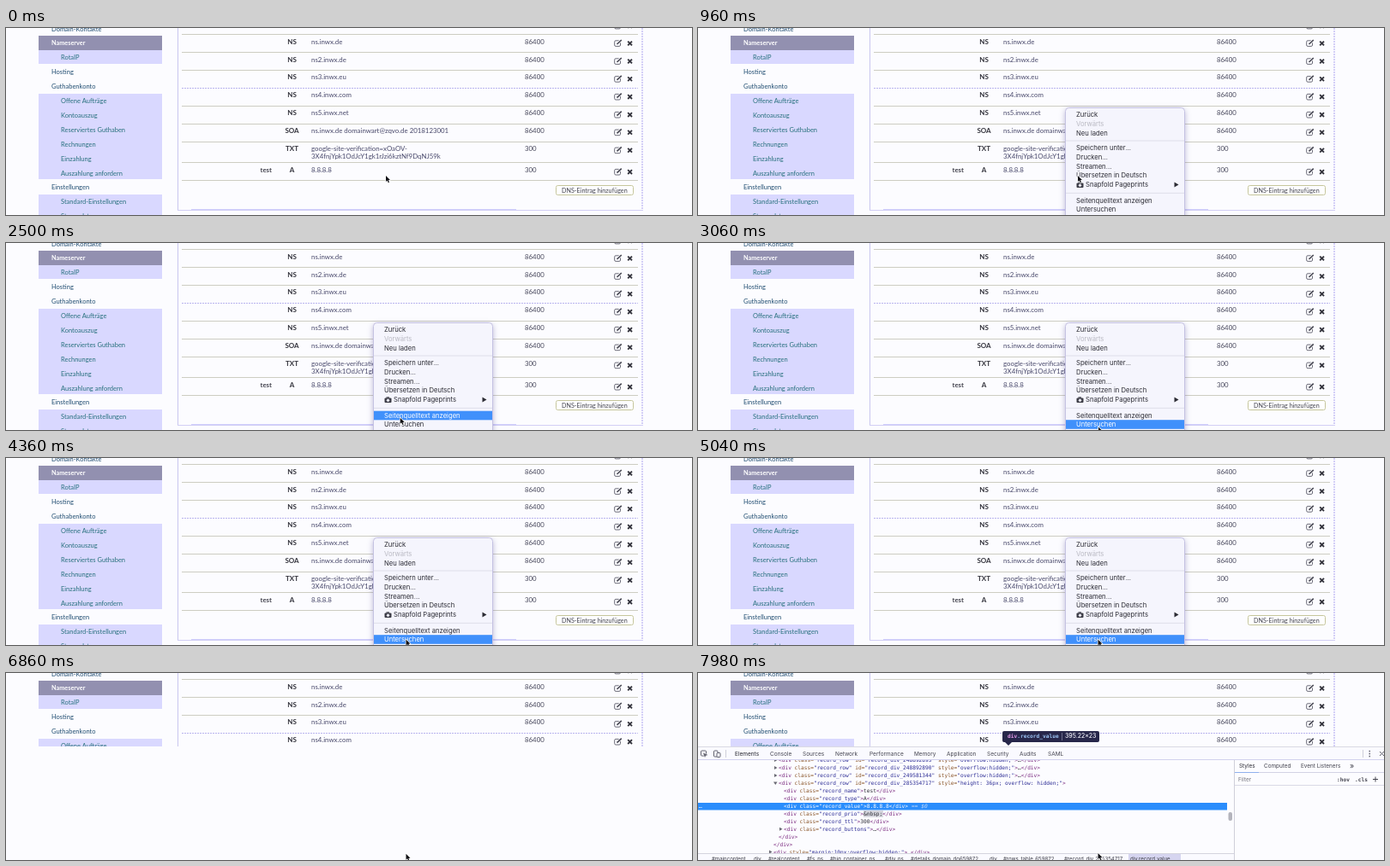
Animation, 800 px wide and 219 px high, one loop 8 s. Source, as an HTML page with a canvas:

```html
<!DOCTYPE html>
<html lang="de">
<head>
<meta charset="utf-8">
<title>DNS-Einträge untersuchen</title>
<style>
  html, body { margin: 0; width: 100%; height: 100%; overflow: hidden; background: #fcfcff; }
  canvas { display: block; width: 800px; height: 219px; }
</style>
</head>
<body>
<canvas id="stage" width="800" height="219"></canvas>
<script>
const ctx = document.getElementById('stage').getContext('2d');
const LOOP = 8000;
const BG = '#fcfcff';
const LATO = 'Lato, sans-serif';
const UI = 'Inter, sans-serif';
const MONO = '"DejaVu Sans Mono", monospace';
const CODE = '6.18px ' + MONO;
const CHAR = 3.72;

const T = {
  menuOpen: 420, menuClick: 5080, menuGone: 5240,
  split: 6850, tools: 7120, tree: 7220, tip: 7420
};

function rect(x, y, w, h, color) {
  ctx.fillStyle = color;
  ctx.fillRect(x, y, w, h);
}

function round(x, y, w, h, r, fill, stroke) {
  ctx.beginPath();
  ctx.roundRect(x, y, w, h, r);
  if (fill) { ctx.fillStyle = fill; ctx.fill(); }
  if (stroke) { ctx.strokeStyle = stroke; ctx.lineWidth = 1; ctx.stroke(); }
}

// y is the middle of the capitals
function text(str, x, y, font, color) {
  ctx.font = font;
  ctx.fillStyle = color;
  ctx.fillText(str, x, y + parseFloat(font.match(/[\d.]+px/)[0]) * 0.36);
}

function line(x1, y1, x2, y2, color, dash = [], width = 1) {
  ctx.strokeStyle = color;
  ctx.lineWidth = width;
  ctx.setLineDash(dash);
  ctx.beginPath();
  ctx.moveTo(x1, y1);
  ctx.lineTo(x2, y2);
  ctx.stroke();
  ctx.setLineDash([]);
}

function poly(points, fill, stroke, width = 1) {
  ctx.beginPath();
  points.forEach(([x, y]) => ctx.lineTo(x, y));
  ctx.closePath();
  if (stroke) {
    ctx.strokeStyle = stroke;
    ctx.lineWidth = width;
    ctx.lineJoin = 'round';
    ctx.stroke();
  }
  if (fill) { ctx.fillStyle = fill; ctx.fill(); }
}

/* ---------- page ---------- */

const NAV = [
  ['Domain-Kontakte', 1], ['Nameserver', 17.3, 'on'], ['RotaIP', 34.5, 'sub'],
  ['Hosting', 51.3], ['Guthabenkonto', 68.3],
  ['Offene Aufträge', 85.5, 'sub'], ['Kontoauszug', 102.3, 'sub'],
  ['Reserviertes Guthaben', 119.3, 'sub'], ['Rechnungen', 136, 'sub'],
  ['Einzahlung', 153, 'sub'], ['Auszahlung anfordern', 170, 'sub'],
  ['Einstellungen', 186.7], ['Standard-Einstellungen', 203.5, 'sub'],
  ['Stammdaten', 220.3, 'sub']
];

const RECORDS = [
  ['', 'NS', ['ns.inwx.de'], '86400', 15.7],
  ['', 'NS', ['ns2.inwx.de'], '86400', 36.7],
  ['', 'NS', ['ns3.inwx.eu'], '86400', 57.5],
  ['', 'NS', ['ns4.inwx.com'], '86400', 78.3],
  ['', 'NS', ['ns5.inwx.net'], '86400', 99.3],
  ['', 'SOA', ['ns.inwx.de domainwart@zqvo.de 2018123001'], '86400', 120],
  ['', 'TXT', ['google-site-verification=xOaOV-', '3X4fnjYpk1OdJcY1gk1rJzi6kztNf9DqNJ59k'], '300', 141],
  ['test', 'A', ['8.8.8.8'], '300', 166.3]
];

function sidebar() {
  rect(38, 9, 144, 17, '#9290b0');
  rect(38, 26, 144, 16, '#d9d8ff');
  rect(38, 77, 144, 100, '#d9d8ff');
  rect(38, 195, 144, 24, '#d9d8ff');
  for (const [label, y, kind] of NAV) {
    const color = kind === 'on' ? '#ffffff' : kind ? '#27707c' : '#1f4c70';
    text(label, kind === 'sub' ? 64 : 53, y, (kind === 'on' ? 'bold 7.3px ' : '7.5px ') + LATO, color);
  }
}

function rowIcons(y) {
  const ink = '#4a4a55';
  round(709.7, y - 3.2, 6.8, 6.6, 1.4, null, '#6b6b78');
  line(712.3, y + 1.2, 717.8, y - 4, BG, [], 3.2);
  line(712.5, y + 1, 717.8, y - 4, ink, [], 1.7);
  line(725.2, y - 2.4, 730, y + 2.4, '#33333c', [], 1.9);
  line(730, y - 2.4, 725.2, y + 2.4, '#33333c', [], 1.9);
}

function page() {
  sidebar();
  line(200.5, 0, 200.5, 213, '#c9c6ee');
  line(742, 0, 742, 214, '#c2bcf4', [2, 1], 1.4);
  line(200, 213.5, 742, 213.5, '#d2cff5');
  line(216, 212.5, 595, 212.5, '#cfcdfb');
  [7, 28, 49, 70, 91, 112, 133, 157, 178].forEach(y =>
    line(205, y + 0.5, 737, y + 0.5, y === 70 ? '#b9b4ee' : '#cdcdc2', y === 70 ? [2, 1] : []));
  rowIcons(-2.5);
  for (const [name, type, values, ttl, y] of RECORDS) {
    text(name, 296.5, y, 'bold 7.85px ' + LATO, '#44444f');
    ctx.textAlign = 'center';
    text(type, 333.5, y, 'bold 8px ' + LATO, '#33333c');
    ctx.textAlign = 'left';
    values.forEach((v, i) => text(v, 356, y + i * 9.3, '7.85px ' + LATO, '#48486a'));
    text(ttl, 605, y, '7.85px ' + LATO, '#48485c');
    rowIcons(y + 2.3);
  }
  round(641.5, 184.5, 90, 11, 2, '#fefeff', '#c6c69c');
  text('DNS-Eintrag hinzufügen', 648, 190.3, '7.2px ' + LATO, '#44444f');
}

/* ---------- context menu ---------- */

const MENU = [
  ['Zurück', 101.5], ['Vorwärts', 112], ['Neu laden', 123],
  ['Speichern unter…', 140.7], ['Drucken…', 151.3], ['Streamen…', 161.8],
  ['Übersetzen in Deutsch', 172.6], ['Snapfold Pageprints', 183.6],
  ['Seitenquelltext anzeigen', 202], ['Untersuchen', 212.5]
];

// [from, to, item]
const HOVER = [[1480, 2080, 6], [2080, 2300, 7], [2380, 2520, 8], [2520, T.menuClick, 9]];

function menu(t) {
  if (t < T.menuOpen || t >= T.menuGone) return;
  const fade = (T.menuGone - t) / 100;
  const hit = HOVER.find(([a, b]) => t >= a && t < b);
  const active = hit ? hit[2] : t >= T.menuClick + 60 ? 9 : -1;
  ctx.save();
  ctx.globalAlpha = Math.min(1, fade);
  ctx.shadowColor = 'rgba(70,60,140,.4)';
  ctx.shadowBlur = 7;
  ctx.shadowOffsetY = 2;
  round(428.5, 93.5, 139, 150, 4, '#f5f5fd');
  ctx.shadowColor = 'transparent';
  round(428.5, 93.5, 139, 150, 4, null, '#c5c2e2');
  line(429, 132, 567, 132, '#dedeea');
  line(429, 193.3, 567, 193.3, '#dedeea');
  MENU.forEach(([label, y], i) => {
    const on = i === active;
    if (on) rect(429, y - 5.3, 138, 10.6, '#4090fb');
    const color = on ? '#ffffff' : i === 1 ? '#b9b9c2' : '#2c2c34';
    text(label, i === 7 ? 452 : 441, y, '7.65px ' + UI, color);
    if (i !== 7) return;
    round(441.5, y - 2.2, 8, 5.6, 1, '#3c3c46');
    rect(443.5, y - 3.3, 3.5, 1.4, '#3c3c46');
    ctx.beginPath();
    ctx.arc(445.5, y + 0.6, 1.7, 0, 7);
    ctx.fillStyle = '#e8e8f4';
    ctx.fill();
    poly([[555.5, y - 3], [560.5, y], [555.5, y + 3]], color);
  });
  ctx.restore();
}

/* ---------- developer tools ---------- */

const TABS = [['Elements', 43], ['Console', 84], ['Sources', 122], ['Network', 160],
  ['Performance', 200], ['Memory', 252], ['Application', 290], ['Security', 337],
  ['Audits', 375], ['SAML', 408]];

const CRUMBS = [['#maincontent', 16], ['div', 65], ['#realcontent', 82], ['#fs_ns', 127],
  ['#big_container_ns', 154], ['#div_ns', 218], ['#details_domain_do659872', 248],
  ['div', 340], ['#rows_table_659872', 356], ['#record_div_285354717', 427],
  ['div.record_value', 504]];

const row = id => `<div class="record_row" id="record_div_${id}" style="overflow:hidden;">…</div>`;
const cell = (name, value) => `<div class="record_${name}">${value}</div>`;

// [indent x, arrow, markup]
const TREE = [
  [94, '>', row(248892895)],
  [94, '>', row(248892890)],
  [94, '>', row(249581344)],
  [94, 'v', '<div class="record_row" id="record_div_285354717" style="height: 36px; overflow: hidden;">'],
  [100, '', cell('name', 'test')],
  [100, '', cell('type', 'A')],
  [100, '', cell('value', '8.8.8.8')],
  [100, '', cell('prio', '&nbsp;')],
  [100, '', cell('ttl', '300')],
  [100, '>', cell('buttons', '…')],
  [94, '', '</div>'],
  [88, '', '</div>'],
  [88, '>', '<div style="margin:10px;overflow:hidden;">…</div>']
];

function tokenColor(part) {
  if (/^[<>]/.test(part)) return '#7c2c80';
  if (part.endsWith('=')) return '#8a5426';
  return part[0] === '"' ? '#2b2b94' : '#2c2c34';
}

function markup(src, x, y, plain) {
  for (const part of src.match(/<\/?\w+|>|\s\w+=(?=")|"[^"]*"|[^<>"]+/g)) {
    text(part, x, y, CODE, plain || tokenColor(part));
    x += part.length * CHAR;
  }
  return x;
}

function tree() {
  ctx.save();
  ctx.beginPath();
  ctx.rect(0, 102, 625, 109);
  ctx.clip();
  TREE.forEach(([x, arrow, src], i) => {
    const y = 102.1 + i * 8.96;
    const on = i === 6;
    if (on) {
      rect(0, 152, 617, 8.5, '#2a8dfc');
      text('…', 1, y, CODE, '#ffffff');
    }
    if (i === 7) rect(193, y - 4, 23, 8, '#d6d6de');
    if (arrow === '>') poly([[x - 5, y - 2], [x - 1.5, y], [x - 5, y + 2]], '#6a6a74');
    if (arrow === 'v') poly([[x - 6, y - 1.5], [x - 1.5, y - 1.5], [x - 3.7, y + 2]], '#6a6a74');
    const end = markup(src, x, y, on && '#ffffff');
    if (on) text('== $0', end + 4, y, 'italic ' + CODE, '#c4dafa');
  });
  ctx.restore();
  round(618.5, 163, 4.5, 10, 2, '#b4b4bc');
}

function crumbs() {
  rect(0, 211, 625, 8, '#fafaff');
  line(0, 211.5, 625, 211.5, '#d4d4de');
  rect(502, 212, 61, 7, '#d6d5f0');
  CRUMBS.forEach(([label, x]) => text(label, x, 218, '6.1px ' + UI, '#3c3c46'));
}

function stylesPane() {
  const font = '6.4px ' + UI;
  line(625.5, 102, 625.5, 219, '#cfcfda');
  line(626, 116.5, 800, 116.5, '#d2d2e4');
  line(626, 116.5, 654, 116.5, '#8fb0ee');
  text('Styles', 631, 109, font, '#2c2c34');
  text('Computed', 660, 109, font, '#44444f');
  text('Event Listeners', 703, 109, font, '#44444f');
  text('»', 760, 108.5, '9px ' + UI, '#44444f');
  text('Filter', 630, 124.5, font, '#75757f');
  text(':hov', 745, 124.5, 'bold ' + CODE, '#44444f');
  text('.cls', 766, 124.5, 'bold ' + CODE, '#44444f');
  line(787, 124.5, 793, 124.5, '#44444f');
  line(790, 121.5, 790, 127.5, '#44444f');
  line(626, 131.5, 800, 131.5, '#dadae6');
}

function toolbar() {
  const ink = '#62626e';
  rect(0, 87, 800, 15, '#fafaff');
  line(0, 86.5, 800, 86.5, '#dadae2');
  line(0, 101.5, 800, 101.5, '#d2d1ee');
  round(3.5, 91, 6, 6, 1, null, ink);
  poly([[6, 93.5], [11.5, 96], [9, 96.8], [8, 99]], ink, '#fafaff');
  round(18.5, 91, 4.5, 7, 1, null, ink);
  round(22, 93.5, 4, 5, 0.8, '#fafaff', ink);
  line(32.5, 90, 32.5, 99, '#cfcfda');
  TABS.forEach(([label, x], i) => text(label, x, 94.4, '6.5px ' + UI, i ? '#44444f' : '#24242c'));
  line(775.5, 90, 775.5, 99, '#cfcfda');
  [91.5, 94.5, 97.5].forEach(y => rect(782.5, y - 0.7, 1.5, 1.5, ink));
  line(795, 92, 800, 97, ink);
  line(800, 92, 795, 97, ink);
}

function tooltip() {
  round(355, 68, 113, 13, 2, '#27274a');
  poly([[358, 81], [366, 81], [362, 85]], '#27274a');
  const font = 'bold 6.2px ' + MONO;
  text('div', 361, 74, font, '#e39ae8');
  text('.record_value', 372.2, 74, font, '#9cc4f4');
  line(424.5, 70, 424.5, 79, '#6c6c8c');
  text('395.22×23', 428, 74, '500 6.9px ' + UI, '#f4f4fc');
}

function devtools(t) {
  rect(0, 86, 800, 133, BG);
  if (t < T.tools) return;
  toolbar();
  stylesPane();
  if (t >= T.tree) { tree(); crumbs(); }
  if (t >= T.tip) tooltip();
}

/* ---------- pointer ---------- */

// [time, x, y]
const PATH = [[0, 443, 173], [1400, 443, 173], [1900, 443.5, 181], [2080, 443.5, 181],
  [2750, 467, 215.5], [3100, 467, 215.5], [3600, 466.5, 212.5], [5100, 466.5, 212.5],
  [5500, 466.5, 213.5], [6700, 466.5, 211.8], [LOOP, 466.5, 211]];

function pointer(t) {
  const i = PATH.findIndex(p => p[0] > t);
  const [t0, x0, y0] = PATH[i - 1], [t1, x1, y1] = PATH[i];
  const u = (t - t0) / (t1 - t0), e = u * u * (3 - 2 * u);
  ctx.save();
  ctx.translate(x0 + (x1 - x0) * e, y0 + (y1 - y0) * e);
  poly([[0, 0], [0, 7], [1.6, 5.6], [2.8, 8.2], [4, 7.7], [2.9, 5.2], [5, 5]], '#111116', '#ffffff', 1.4);
  ctx.restore();
}

function draw(now) {
  const t = now % LOOP;
  rect(0, 0, 800, 219, BG);
  page();
  menu(t);
  if (t >= T.split) devtools(t);
  pointer(t);
}

const start = performance.now();
function tick() {
  draw(performance.now() - start);
  requestAnimationFrame(tick);
}
tick();
</script>
</body>
</html>
```
